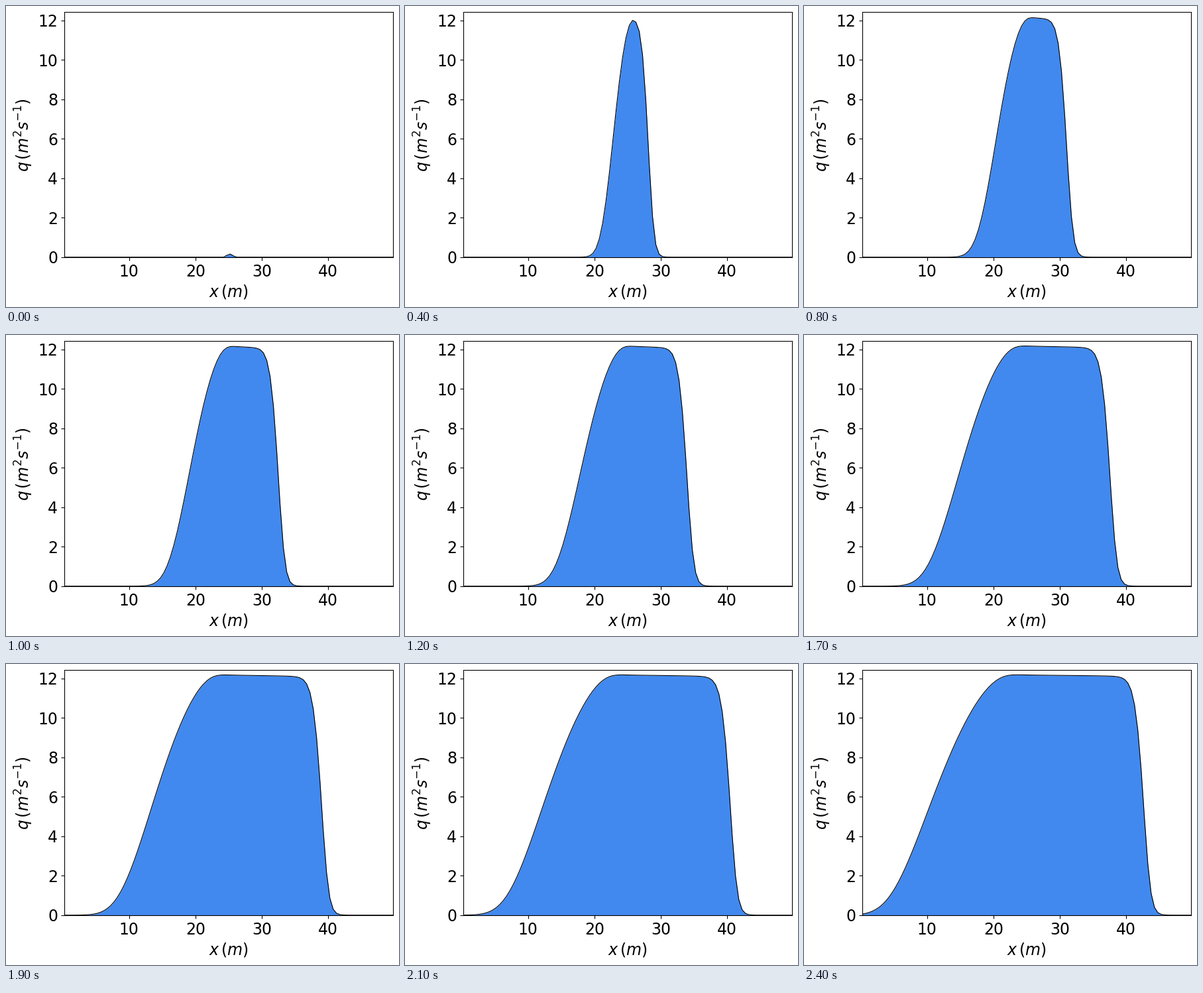
Animation of 593x454 px, one loop 2.5 s. Source, as a matplotlib script:

```python
import numpy as np
import matplotlib.pyplot as plt
from matplotlib.animation import FuncAnimation

W, H, DPI = 593, 454, 100
FRAMES, INTERVAL = 25, 100
G, DX, CELLS = 9.81, 0.5, 100
FIRST_DT, DT, STEPS = 0.001, 0.0168, 6

x = (np.arange(CELLS) + 0.5) * DX


def step(h, q, dt):
    """Advance the shallow-water equations with an HLL flux."""
    h, q = np.pad(h, 1, mode="edge"), np.pad(q, 1, mode="edge")
    state = np.array([h, q])
    flux = np.array([q, q**2 / h + G * h**2 / 2])
    u, c = q / h, np.sqrt(G * h)
    left = np.minimum(0, np.minimum((u - c)[:-1], (u - c)[1:]))
    right = np.maximum(0, np.maximum((u + c)[:-1], (u + c)[1:]))
    f = (right * flux[:, :-1] - left * flux[:, 1:]
         + left * right * np.diff(state)) / (right - left)
    return state[:, 1:-1] - dt / DX * np.diff(f)


def simulate():
    """Dam break: 6 m of water on the left, 2 m on the right."""
    mid = CELLS // 2
    h = np.where(np.arange(CELLS) < mid, 6.0, 2.0)
    h[mid] = 4.0
    h, q = step(h, np.zeros(CELLS), FIRST_DT)
    history = [q]
    for _ in range(FRAMES - 1):
        for _ in range(STEPS):
            h, q = step(h, q, DT)
        history.append(q)
    return history


discharge = simulate()

plt.rcParams.update({"font.family": "DejaVu Sans", "font.size": 17,
                     "mathtext.fontset": "dejavusans"})
fig = plt.figure(figsize=(W / DPI, H / DPI), dpi=DPI, facecolor="white")
ax = fig.add_axes([87.87 / W, 75.2 / H, 496 / W, 369.6 / H])
ax.set_xlim(x[0], x[-1])
ax.set_ylim(0, 12.42)
ax.set_xticks(range(10, 50, 10))
ax.set_yticks(range(0, 13, 2))
ax.set_xlabel(r"$x\,(m)$")
ax.set_ylabel(r"$q\,(m^2 s^{-1})$")

water = ax.fill_between(x, 0, discharge[0], color="#4189EF", lw=0)
line, = ax.plot(x, discharge[0], color="black", lw=0.8)


def update(i):
    q = discharge[i]
    line.set_ydata(q)
    top = np.column_stack([x, q])
    water.set_verts([np.vstack([[x[0], 0], top, [x[-1], 0]])])
    return water, line


anim = FuncAnimation(fig, update, frames=FRAMES, interval=INTERVAL,
                     repeat=True, repeat_delay=0)
plt.show()
```
